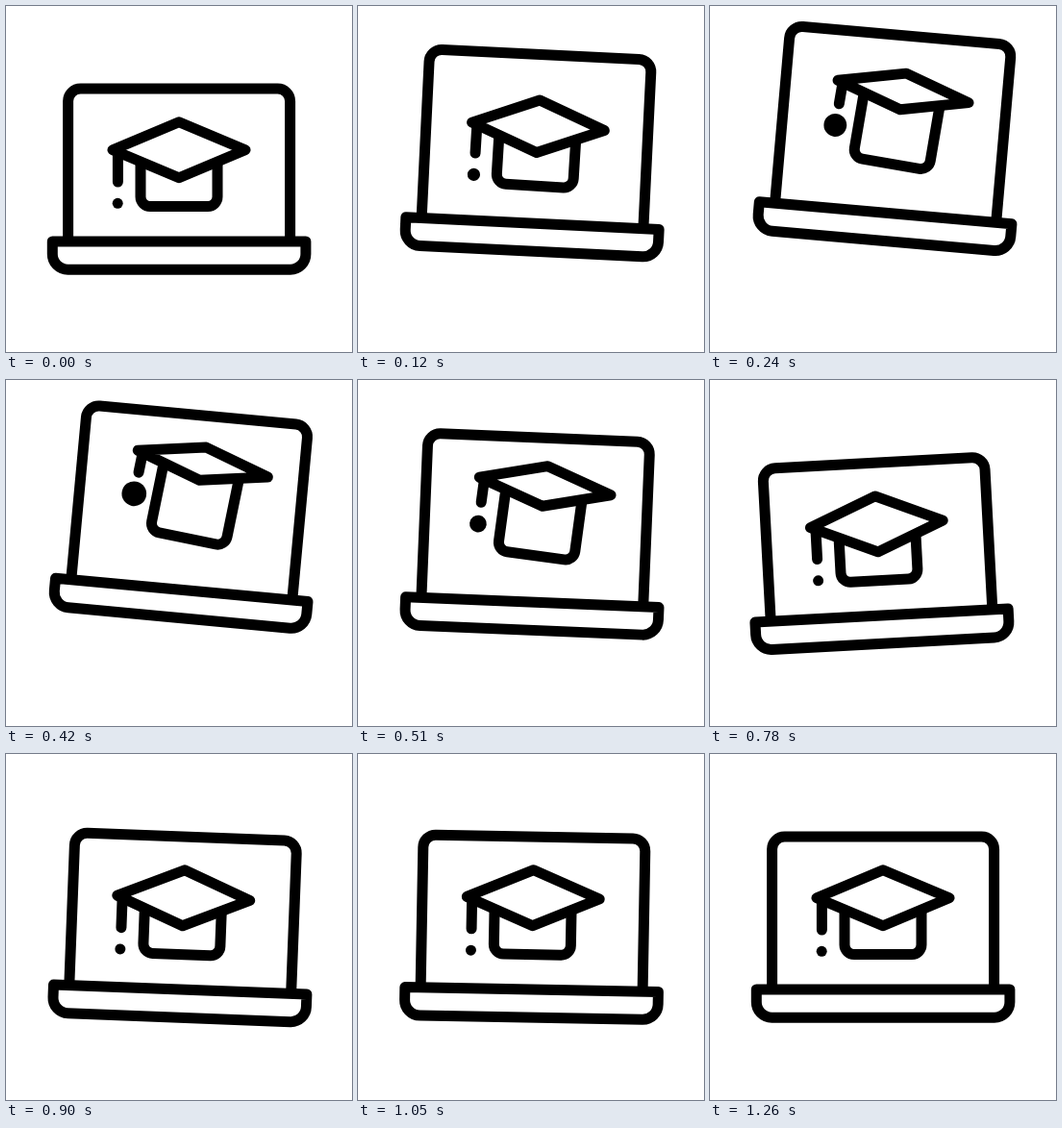
Animation, 360 px wide and 360 px high, one loop 1.35 s. Source, as an HTML page:

```html
<!DOCTYPE html>
<html lang="en">
<head>
<meta charset="utf-8">
<title>Online learning</title>
<style>
  html, body { margin: 0; height: 100%; overflow: hidden; background: #fff; }
  svg { display: block; width: 100vw; height: 100vh; }
  path { fill: none; stroke: #000; stroke-width: 11; stroke-linejoin: round; }
</style>
</head>
<body>
<svg viewBox="0 0 360 360">
  <g id="laptop">
    <path id="lid"/>
    <path d="M48.3 245H311.9V258a16 16 0 0 1-16 16.2H64.3a16 16 0 0 1-16-16.2Z"/>
    <g id="cap">
      <path id="body"/>
      <path id="plate"/>
      <path id="tassel" stroke-linecap="round"/>
      <circle id="bead" cx="116.2"/>
    </g>
  </g>
</svg>
<script>
const LOOP = 1350, STEP = 30;
const set = (id, name, value) => document.getElementById(id).setAttribute(name, value);

// Progress from 0 to 1 between two times.
const span = (t, from, to) => Math.min(1, Math.max(0, (t - from) / (to - from)));
const ease = (t, from, to) => (1 - Math.cos(Math.PI * span(t, from, to))) / 2;
const easeOut = (t, from, to, power) => 1 - (1 - span(t, from, to)) ** power;

// Leap up, then fall under gravity.
const jump = t => easeOut(t, 0, 300, 1.8) - span(t, 300, 570) ** 2.3;

// Swing right, left, right again and settle.
const tilt = t => 6.1 * easeOut(t, 0, 340, 1.4) - 10.1 * ease(t, 350, 735)
  + 6.3 * ease(t, 735, 915) - 2.3 * ease(t, 915, 1170);

// The cap is tossed up and lands; its tilt and bead follow a little later.
const toss = t => ease(t, 60, 300) - ease(t, 420, 660);
const capTilt = t => 6.3 * (ease(t, 60, 330) - ease(t, 420, 780));
const beadSize = t => 5.5 + 7.5 * ease(t, 60, 300) - 9.5 * ease(t, 400, 640)
  + 2 * ease(t, 640, 760);

function draw(t) {
  const height = jump(t), p = toss(t);
  const lidTop = 86 - 28 * height;
  set('laptop', 'transform', `translate(0 ${-31.6 * height}) rotate(${tilt(t)} 180 274)`);
  set('lid', 'd', `M64.6 245V${lidTop + 13}a13 13 0 0 1 13-13H282.6a13 13 0 0 1 13 13V245`);

  const half = 29 * (1 - 0.4 * p), mid = 149.7;
  const rim = mid + 0.42 * half, floor = 208.6 + 20.5 * p;
  set('cap', 'transform', `translate(0 ${-38 * p}) rotate(${capTilt(t)} 180 240)`);
  set('plate', 'd', `M111 ${mid}L180 ${mid - half}L249 ${mid}L180 ${mid + half}Z`);
  set('body', 'd', `M140 ${rim}V${floor - 10}a10 10 0 0 0 10 10H210a10 10 0 0 0 10-10V${rim}`);
  set('tassel', 'd', `M116.4 ${mid + 2}V${183 - 11 * p}`);
  set('bead', 'cy', 205.3 - 10.7 * p);
  set('bead', 'r', beadSize(t));
}

const start = performance.now();
function tick() {
  const t = (performance.now() - start) % LOOP;
  draw(Math.floor(t / STEP) * STEP);
  requestAnimationFrame(tick);
}
tick();
</script>
</body>
</html>
```
